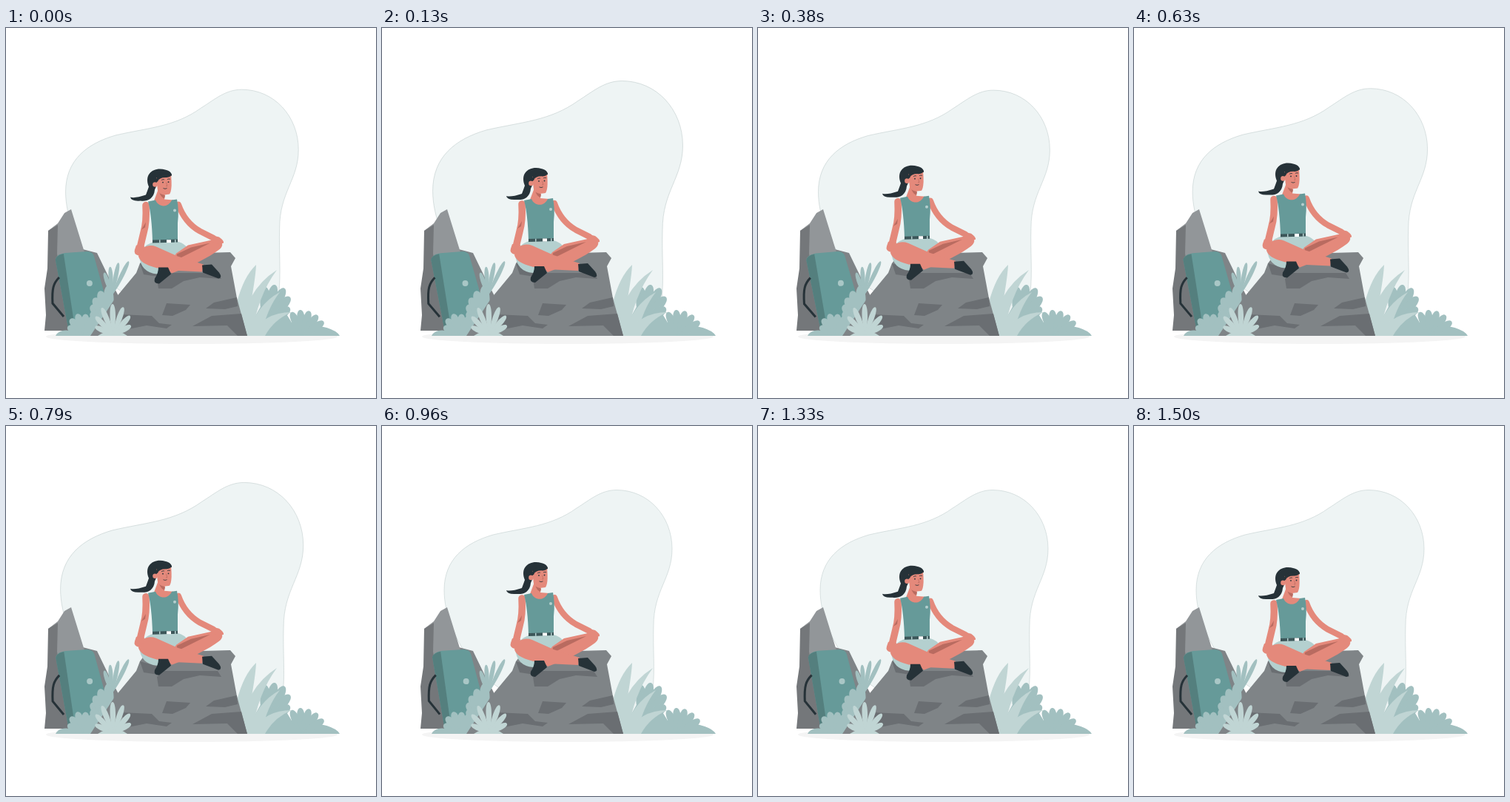
An HTML page for the animation above (1.54 s loop, 500 by 500 pixels).

```html
<!DOCTYPE html>
<html lang="en">
<head>
<meta charset="utf-8">
<title>Meditating hiker</title>
<style>
  html, body { margin: 0; width: 100%; height: 100%; overflow: hidden; background: #fff; }
  svg { display: block; width: 100%; height: 100%; }
  .bush { fill: #a2c0c0; }
  .leaf { fill: #c0d5d4; }
  .stone { fill: #7f8487; }
  .shade { fill: #6a6e72; }
  .skin { fill: #e4897b; }
  .fold { fill: #b96b60; }
  .dark { fill: #263238; }
  .teal { fill: #669a99; }
  .shorts { fill: #b4d0cf; }
  .limb { fill: none; stroke: #e4897b; stroke-linecap: round; }
  .ink { fill: none; stroke: #263238; }
</style>
</head>
<body>
<svg viewBox="0 0 500 500">
  <path id="blob" fill="#eef4f4" stroke="#b9c6c6" stroke-width=".5" d="M84 222C84 180 112 158 150 147C193 137 228 136 263 111C282 99 296 86.5 317 86.5C360 86.5 392 122 392 166C392 206 367 222 367 270C366 300 369 330 366 356C363 395 330 400 290 400C230 400 150 360 120 318C100 290 84 255 84 222Z"/>
  <ellipse cx="251" cy="417" rx="197" ry="10" fill="#f4f4f4"/>

  <path class="stone" d="M100 298L123 304L138 335L152 362V409H80Z"/>
  <path fill="#929699" d="M57 274L70 264L79 250L88 245L106 303L112 409H57Z"/>
  <path fill="#74777a" d="M57 274L70 266L69 305L88 409H52L54 388L52 352L56 325Z"/>

  <g id="pack">
    <path class="teal" d="M67 313Q68 306 80 304L109 302Q117 302 119 308L134 362V385Q120 405 84 405Z"/>
    <path fill="#547f7e" d="M67 313Q68 307 78 305L93 405H84Z"/>
    <path class="ink" stroke-width="3" d="M72 337C64 345 62 352 63 372L78 390"/>
    <circle cx="113" cy="345" r="4" fill="#a9c7c6"/>
  </g>

  <g id="backLeaves" class="bush"></g>
  <g id="leftBush" class="bush"><path d="M67 416Q72 405 92 410L130 375L150 380V416Z"/></g>
  <g id="rightBush" class="bush"><path d="M322 416L345 375H372L386 398Q444 402 451 416Z"/></g>
  <g class="leaf">
    <path d="M312 416V371Q321 336 338 320Q337 345 322 416Z"/>
    <path d="M316 416Q322 355 366 327Q340 362 332 416Z"/>
    <path d="M326 416Q338 374 370 357Q352 380 345 416Z"/>
    <path d="M330 416Q348 384 386 384Q362 394 350 416Z"/>
  </g>

  <path class="stone" d="M114 416L147 366L176 331L181 318L190 306L303 303L310 311L304 322L312 365L326 416Z"/>
  <g class="shade">
    <path d="M181 318L186 333L206 336V325Z"/>
    <path d="M204 339L214 331H286L291 339L262 337L240 342L224 352H206Z"/>
    <path d="M217 372L249 374L243 381L225 389L211 388Z"/>
    <path d="M154 387L197 389L207 399L224 401L217 406L190 402L165 407Z"/>
    <path d="M270 379L281 371L312 364L313 376L296 380Z"/>
    <path d="M252 403L278 389L318 386L326 416H313L299 402Z"/>
  </g>
  <g id="frontLeaves" class="leaf"><path d="M124 416Q145 402 164 416Z"/></g>

  <g id="woman">
    <path class="shorts" d="M180 308Q182 331 204 333L232 318L245 298Q242 292 232 289L198 290Q184 295 180 308Z"/>
    <path class="skin" d="M230 305L246 294L278 287C291 285 297 293 288 300C274 311 250 322 224 332L217 325Z"/>
    <path class="fold" d="M231 306L250 297L276 291L248 305L230 314Z"/>
    <path class="skin" d="M179 309C181 296 193 292 203 296L232 309L267 320L265 330L222 328C200 325 182 320 179 309Z"/>
    <path class="dark" d="M206 324H219L223 333L207 346Q199 346 201 339Q206 332 206 324Z"/>
    <path class="dark" d="M265 321L278 320L288 331Q293 338 287 339L266 331Z"/>

    <path class="limb" stroke-width="8" d="M233 239C239 256 248 267 262 275L280 284"/>
    <path class="skin" d="M276 280L288 283Q295 288 294 291Q288 294 278 289Z"/>
    <path class="limb" stroke-width="9.5" d="M189 240C190 258 189 267 186 277L181 298"/>
    <path class="skin" d="M176 294L187 295Q187 304 179 308Q172 306 174 300Z"/>
    <path class="fold" d="M183 273L189 263L188 270Z"/>
    <path class="skin" d="M200 234L206 218L215 224L214 232L226 233L222 245H203Z"/>
    <path class="fold" d="M207 222L215 227L214 231Q209 229 207 222Z"/>
    <path class="teal" d="M192 235L202 233C206 243 219 244 224 233L231 232Q234 246 232 264V288L198 289Q197 254 192 235Z"/>
    <circle cx="228" cy="247" r="2" fill="#b5cfce"/>
    <path fill="#3c5659" d="M198 287L232 286V290L198 291Z"/>
    <path fill="#fff" d="M217 286.6h6v4h-6z"/>
    <path class="shorts" d="M207 286.8h1.5v4h-1.5zM228 286.4h1.5v4h-1.5z"/>

    <path class="dark" d="M193 215C187 200 196 191 208 191Q224 192 224 200L206 208L201 219C200 232 190 235 182 234Q169 235 168 229Q174 231 189 226Q192 218 193 215Z"/>
    <path class="skin" d="M203 203L223 199Q225 219 221 225Q208 228 205 220Z"/>
    <circle class="skin" cx="201.500" cy="212" r="3.300"/>
    <path class="dark" d="M202 209Q203 198 213 197L224 198Q223 202 217 202.500Q207 202 205 208Z"/>
    <circle class="dark" cx="212" cy="209" r=".9"/>
    <circle class="dark" cx="219.500" cy="208.600" r=".9"/>
    <path class="ink" stroke-width=".8" d="M210 206Q212 204.500 214 205.300M218 205Q220 203.800 222 204.800M212.500 217Q215 218.500 217.500 217"/>
    <path fill="none" stroke="#b96b60" stroke-width=".7" d="M216.500 209L218 214H216"/>
  </g>
</svg>
<script>
const PERIOD = 1540, START = 0.021;
const $ = id => document.getElementById(id);

// Fan of round-tipped leaves; angles in degrees, bulge lengthens the middle ones
function fan(id, { x, y, from, to, count, first, last = first, bulge = 0, width = 5 }) {
  for (let i = 0; i < count; i++) {
    const t = i / (count - 1);
    const length = first + (last - first) * t + bulge * Math.sin(Math.PI * t);
    const path = document.createElementNS("http://www.w3.org/2000/svg", "path");
    path.setAttribute("d", `M0 0C${length * 0.4} ${width} ${length} ${width} ${length} 0` +
      `C${length} ${-width} ${length * 0.4} ${-width} 0 0Z`);
    path.setAttribute("transform", `translate(${x} ${y}) rotate(${from + (to - from) * t})`);
    $(id).append(path);
  }
}

fan("backLeaves", { x: 143, y: 362, from: -64, to: -108, count: 4, first: 52, last: 33, width: 4 });
fan("leftBush", { x: 105, y: 414, from: -155, to: -60, count: 5, first: 24, bulge: 5, width: 7 });
fan("leftBush", { x: 140, y: 400, from: -150, to: -92, count: 5, first: 30, last: 52, width: 9 });
fan("rightBush", { x: 350, y: 400, from: -90, to: -33, count: 5, first: 50, last: 40, bulge: 10, width: 9 });
fan("rightBush", { x: 400, y: 416, from: -114, to: -33, count: 5, first: 35, width: 7 });
fan("frontLeaves", { x: 145, y: 415, from: -155, to: -28, count: 7, first: 27, bulge: 15 });

const ramp = (p, a, b) => Math.min(1, Math.max(0, (p - a) / (b - a)));
const beat = p => ramp(p, 0, .1) - ramp(p, .1, .3) + ramp(p, .4, .5) - ramp(p, .5, .6);
const rise = p => 1 - Math.abs(2 * p - 1);
const sway = p => -Math.asin(Math.sin(2 * Math.PI * p)) * 2 / Math.PI;

function draw() {
  const p = (performance.now() / PERIOD + START) % 1;
  $("blob").setAttribute("transform", `translate(243 241) scale(${1 + 0.1 * beat(p)}) translate(-243 -241)`);
  $("woman").setAttribute("transform", `translate(0 ${-10 * rise(p)})`);
  $("pack").setAttribute("transform", `rotate(${1.2 * sway(p)} 105 400)`);
  requestAnimationFrame(draw);
}
draw();
</script>
</body>
</html>
```
